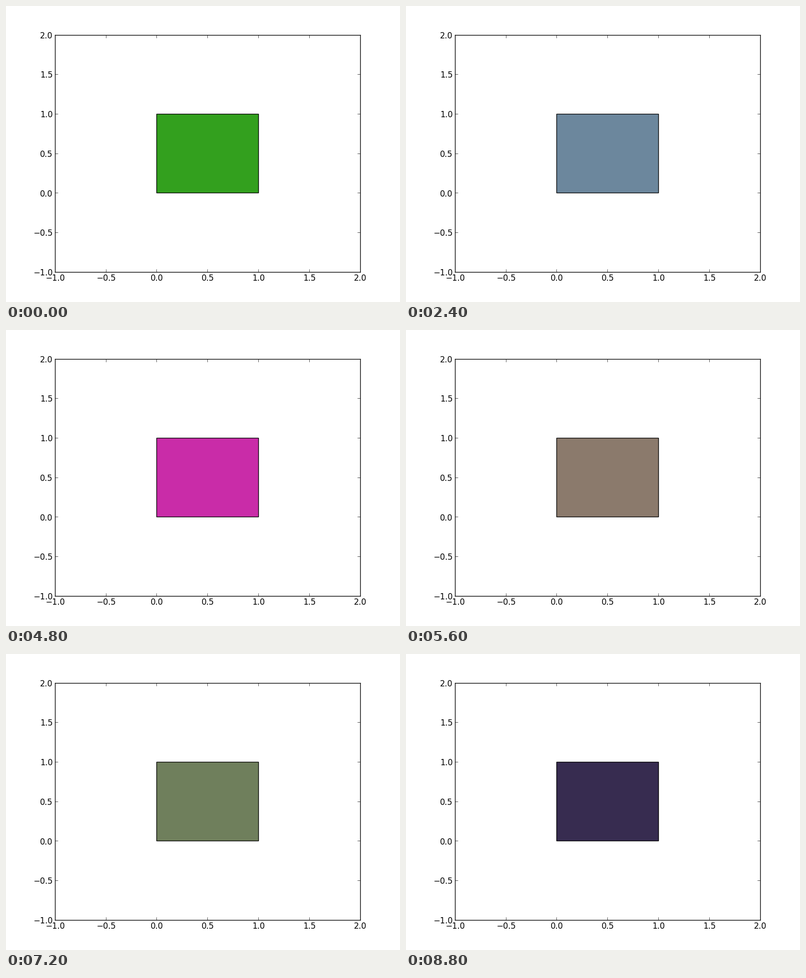
These frames come from a looping animation (812x612 px, 9.6 s). A matplotlib script:

```python
import matplotlib.pyplot as plt
import numpy as np
from matplotlib.animation import FuncAnimation
from matplotlib.patches import Rectangle

WIDTH, HEIGHT, DPI = 812, 612, 100
LEFT, RIGHT, TOP, BOTTOM = 100.65, 730.0, 59.6, 549.7  # axes edges in pixels
STEP_MS = 800
COLORS = [
    "#33a01e", "#8a6a4f", "#5f9a86", "#6c879d", "#0a42d8", "#7d6fa3",
    "#c92ca8", "#8b7a6c", "#2aa0d3", "#6f7f5c", "#67240b", "#372c50",
]

plt.rcParams["font.family"] = "DejaVu Sans"

# The tiny margin keeps the pixel size from truncating to 811.
fig = plt.figure(figsize=((WIDTH + 1e-4) / DPI, (HEIGHT + 1e-4) / DPI),
                 dpi=DPI, facecolor="white")
ax = fig.add_axes([LEFT / WIDTH, 1 - BOTTOM / HEIGHT,
                   (RIGHT - LEFT) / WIDTH, (BOTTOM - TOP) / HEIGHT])
ticks = np.linspace(-1, 2, 7)
ax.set(xlim=(-1, 2), ylim=(-1, 2), xticks=ticks, yticks=ticks)
ax.tick_params(direction="in", length=4, width=0.5, top=True, right=True,
               labelbottom=False, labelleft=False)
for spine in ax.spines.values():
    spine.set_linewidth(1.0)


def label(x, y, value, align):
    text = f"{value:.1f}".replace("-", "\u2212")
    fig.text(x / WIDTH, 1 - y / HEIGHT, text, fontsize=12, ha=align, va="baseline")


for tick in ticks:
    part = (tick + 1) / 3
    label(LEFT + part * (RIGHT - LEFT) + 0.3, 568, tick, "center")
    label(96, BOTTOM + part * (TOP - BOTTOM) + 7.2, tick, "right")

square = ax.add_patch(Rectangle((0, 0), 1, 1, facecolor=COLORS[0],
                                edgecolor="black", linewidth=1.0))


def update(step):
    square.set_facecolor(COLORS[step])
    return [square]


anim = FuncAnimation(fig, update, frames=len(COLORS), interval=STEP_MS,
                     repeat=True, repeat_delay=0)
plt.show()
```
